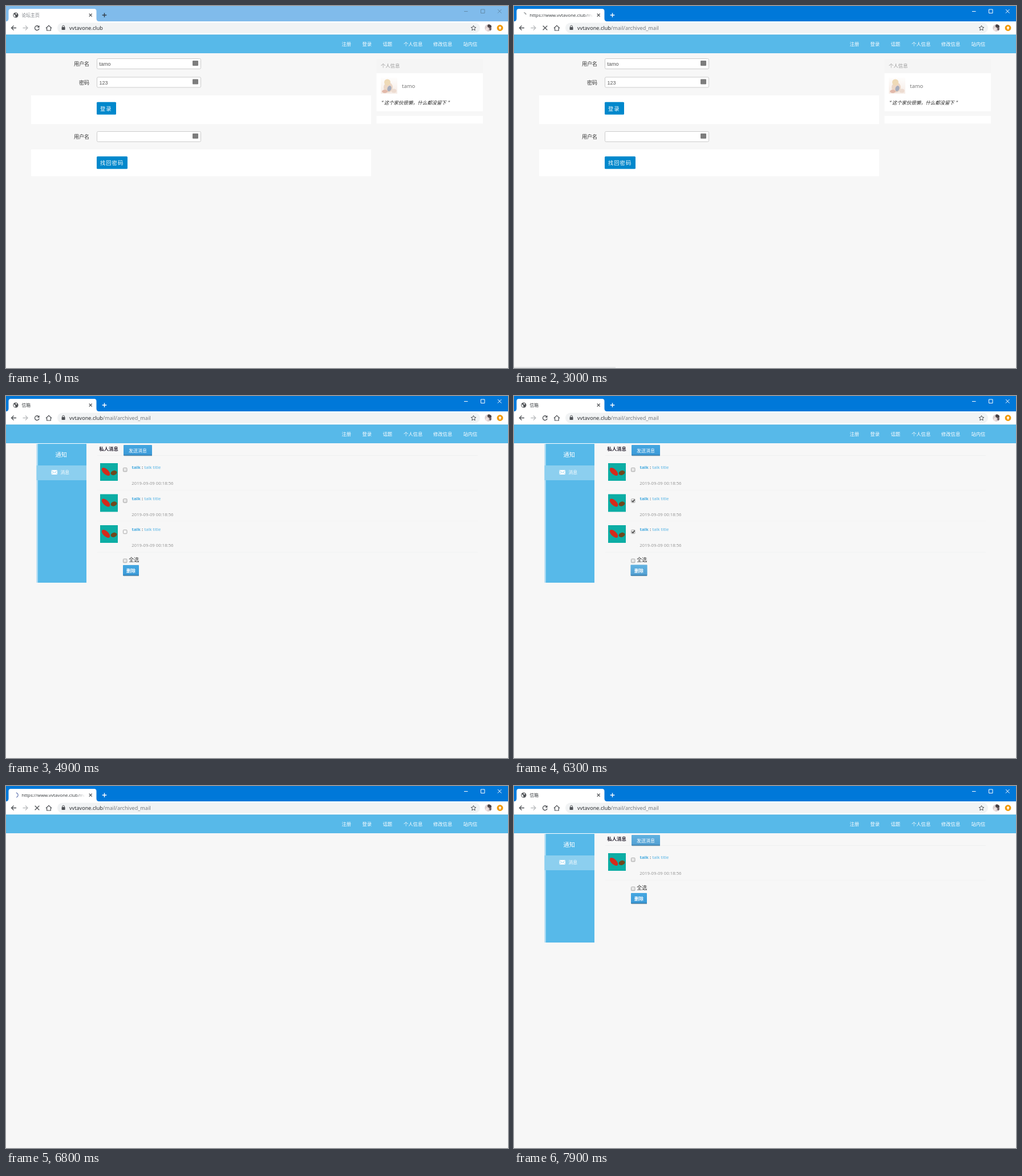
Write an HTML page with a canvas that moves like this. It is 880 px wide and 636 px high and loops after 8 s.

```html
<!DOCTYPE html>
<html lang="zh-CN">
<head>
<meta charset="utf-8">
<title>论坛主页</title>
<style>
  html, body { margin: 0; width: 100%; height: 100%; overflow: hidden; background: #f7f7f7; }
  canvas { display: block; }
</style>
</head>
<body>
<canvas id="stage" width="880" height="636"></canvas>
<script>
const LOOP = 8000;
const HOST = 'vvtavone.club', PATH = '/mail/archived_mail', USER = 'tamo', SENDER = 'talk';
const LATIN = '"Noto Sans", "Open Sans", sans-serif';
const CJK = '"Noto Sans CJK SC", "Noto Sans CJK", "Noto Sans", sans-serif';
const FORM = '"Liberation Sans", Arial, sans-serif';
const SKY = '#57b9e9', PAGE = '#f7f7f7', ICON = '#505357';
const ROW = 54.5;
const ctx = document.getElementById('stage').getContext('2d');

function rect(x, y, w, h, fill) {
  ctx.fillStyle = fill;
  ctx.fillRect(x, y, w, h);
}

function round(x, y, w, h, r, fill, stroke) {
  ctx.beginPath();
  ctx.roundRect(x, y, w, h, r);
  if (fill) { ctx.fillStyle = fill; ctx.fill(); }
  if (stroke) { ctx.strokeStyle = stroke; ctx.lineWidth = 1; ctx.stroke(); }
}

function ellipse(x, y, rx, ry, fill, turn = 0) {
  ctx.beginPath();
  ctx.ellipse(x, y, rx, ry, turn, 0, Math.PI * 2);
  ctx.fillStyle = fill;
  ctx.fill();
}

function path(d, color, width = 1.2, fill = false) {
  const shape = new Path2D(d);
  if (fill) {
    ctx.fillStyle = color;
    ctx.fill(shape);
  } else {
    ctx.strokeStyle = color;
    ctx.lineWidth = width;
    ctx.stroke(shape);
  }
}

function text(s, x, baseline, size, color, family = LATIN, style = '') {
  ctx.font = `${style} ${size}px ${family}`;
  ctx.fillStyle = color;
  ctx.fillText(s, x, baseline);
  return ctx.measureText(s).width;
}

// Chinese text placed by its vertical centre
function han(s, x, middle, size, color, style = '') {
  text(s, x, middle + size * 0.38, size, color, CJK, style);
}

function spaced(s, x, middle, size, color) {
  ctx.letterSpacing = '1px';
  han(s, x, middle, size, color);
  ctx.letterSpacing = '0px';
}

function gradient(y0, y1, top, bottom) {
  const g = ctx.createLinearGradient(0, y0, 0, y1);
  g.addColorStop(0, top);
  g.addColorStop(1, bottom);
  return g;
}

function globe() {
  ellipse(17, 16, 4.6, 4.6, ICON);
  path('M13.6 14.2 L16 16 L16.6 19 L15.2 19.6 Q13 18 13.4 15Z M16.6 12.4 L19.6 13.5 L18.4 15.2 L16.8 14.4Z', '#fff', 1, true);
}

function spinner({ from, sweep, color }) {
  ctx.beginPath();
  ctx.arc(17, 16, 4.2, from, from + sweep);
  ctx.strokeStyle = color;
  ctx.lineWidth = 1.1;
  ctx.stroke();
}

function drawTabStrip(s) {
  rect(0, 0, 880, 27, s.active ? '#0078d9' : '#80bbeb');
  path('M0 27 Q4.5 27 4.5 22 V9 Q4.5 5 8.5 5 H154.5 Q158.5 5 158.5 9 V22 Q158.5 27 163 27Z', '#fff', 1, true);
  const ink = s.active ? '#3c4043' : '#777b80';
  if (s.loading) {
    spinner(s.loading);
    ctx.save();
    ctx.beginPath();
    ctx.rect(27, 6, 112, 20);
    ctx.clip();
    const fade = ctx.createLinearGradient(122, 0, 139, 0);
    fade.addColorStop(0, ink);
    fade.addColorStop(1, 'rgba(60,64,67,0)');
    text(`https://www.${HOST}${PATH}`, 27.5, 19, 7.9, fade);
    ctx.restore();
  } else {
    globe();
    han(s.view === 'login' ? '论坛主页' : '信箱', 27.5, 16.3, 7.8, ink);
  }
  path('M145.7 13.5 l5 5 m0 -5 l-5 5', ICON, 1.1);
  path('M168.7 16 h7.6 M172.5 12.2 v7.6', s.active ? '#fff' : '#333f4a', 1.4);
  const control = s.active ? '#fff' : '#638ba9';
  path('M803 9.5 h6.5 M832.5 6 h6.5 v6.5 h-6.5Z M862 6 l6.5 6.5 m0 -6.5 l-6.5 6.5', control, 1);
}

function drawToolbar(s) {
  rect(0, 27, 880, 23, '#fff');
  path('M18 38.5 h-8.5 m4 -4 l-4 4 l4 4', ICON, 1.3);
  path('M29.5 38.5 h8.5 m-4 -4 l4 4 l-4 4', '#babcbe', 1.3);
  if (s.loading) {
    path('M50.7 34.7 l7.6 7.6 m0 -7.6 l-7.6 7.6', ICON, 1.3);
  } else {
    path('M57.6 36.4 A3.9 3.9 0 1 0 58.2 39.5', ICON, 1.3);
    path('M58.6 34 v4 h-4Z', ICON, 1, true);
  }
  path('M70 39 L75 34.3 L80 39 M71.6 38 v5 h6.8 v-5', ICON, 1.2);

  round(90, 29.5, 741, 18, 9, '#f1f3f4');
  round(97.6, 37, 6, 5, 0.7, ICON);
  path('M98.8 37.4 v-1.4 a1.8 1.8 0 0 1 3.6 0 v1.4', ICON, 1);
  const w = text(HOST, 111, 41.7, 9.1, '#2b2e31');
  if (s.path) text(PATH, 111 + w, 41.7, 9.1, '#74787c');
  path('M819.5 34.3 l1.3 2.9 l3.1 .3 l-2.4 2.1 l.7 3.1 l-2.7 -1.6 l-2.7 1.6 l.7 -3.1 l-2.4 -2.1 l3.1 -.3Z', ICON, 1);

  ellipse(845.5, 38.5, 6.2, 6.2, '#d9cdcd');
  ellipse(847.5, 35.5, 3.6, 2.8, '#4a4145', 0.5);
  ellipse(843, 41, 2.2, 2.8, '#f2e3e2', 0.5);
  ellipse(849, 40.5, 1.8, 2.4, '#6b5a5e');
  ellipse(866, 38.5, 5.4, 5.4, '#f29900');
  path('M866 35.4 l3 3.2 h-1.8 v2.6 h-2.4 v-2.6 h-1.8Z', '#fff', 1, true);
}

function drawNav() {
  rect(0, 50, 880, 33, SKY);
  rect(0, 50, 880, 0.7, '#79bde0');
  const items = [['注册', 588.5], ['登录', 624.5], ['话题', 660.5], ['个人信息', 697], ['修改信息', 749], ['站内信', 801.5]];
  for (const [label, x] of items) han(label, x, 67, 8.3, '#fff');
}

function field(label, labelX, y, value) {
  han(label, labelX, y + 10, 9, '#333');
  round(159.5, y + 0.5, 182, 18, 2, '#fff', '#ccc');
  text(value, 163.5, y + 13.2, 9, '#555', FORM);
  round(327, y + 4, 10, 9, 1, '#7d7d7d');
}

function blueButton(label, y, w) {
  round(159, y, w, 22, 1.5, '#0088cc');
  spaced(label, 165, y + 11.2, 9.3, '#fff');
}

function drawPortrait() {
  rect(657, 126, 29, 28, gradient(126, 154, '#fefdfc', '#f6ece6'));
  ellipse(670, 143, 8, 9, '#ecd7c6');
  ellipse(668.5, 134, 5.5, 5.5, '#efdab7');
  ellipse(672, 145, 3.5, 5, '#a7adbd', 0.3);
  ellipse(664, 150, 5, 3, '#e2b9aa');
  ellipse(680, 149, 4.5, 3.5, '#eddcd1');
}

function drawLogin() {
  field('用户名', 119, 92, USER);
  field('密码', 128, 124.5, '123');
  rect(44, 157, 596, 50.5, '#fff');
  blueButton('登录', 168.8, 34);
  field('用户名', 119, 220, '');
  rect(44, 252, 596, 47, '#fff');
  blueButton('找回密码', 264.2, 54);

  rect(649.5, 93, 186.5, 25, '#f5f5f5');
  han('个人信息', 657, 105.3, 8.3, '#999');
  rect(649.5, 118, 186.5, 67, '#fff');
  drawPortrait();
  text(USER, 694, 144, 9.4, '#777');
  han('" 这个家伙很懒，什么都没留下 "', 657, 170, 8.4, '#222', 'italic');
  rect(649.5, 193, 186.5, 13.5, '#fff');
}

function checkbox(y, state) {
  const fill = state === 'hover' ? '#f6f6f6' : state === 'down' ? '#cfcfcf' : gradient(y, y + 7, '#f1f1f1', '#dedede');
  round(205.5, y + 0.5, 6.5, 6.5, 1, fill, '#a9a9a9');
  if (state === 'on') path(`M206.8 ${y + 3.8} l1.7 1.8 l3 -4`, '#333', 1.5);
}

function raisedButton(label, x, y, w, textX, lit, bold) {
  const grow = lit && bold ? 0.6 : 0;
  rect(x + 1, y + 18, w - 1, 1.6, '#c3c8cb');
  round(x - grow, y - grow, w + 2 * grow, 18.5 + 2 * grow, 1,
    lit ? gradient(y, y + 18, '#61b2e1', '#529fd2') : gradient(y, y + 18, '#45a7e1', '#3a99d7'));
  rect(x, y + 17.5, w, 1, '#33709a');
  han(label, textX, y + 9.6, 8, '#fff', bold ? 'bold' : '');
}

function message(y, state, linkHover) {
  rect(165, y, 31, 31, '#0cada4');
  ellipse(175, y + 15, 9, 4.6, '#d42b1b', 0.75);
  ellipse(189, y + 17, 5.5, 4, '#70471c', -0.3);
  checkbox(y + 7.8, state);
  const w = text(SENDER, 220.5, y + 10, 7.8, linkHover ? '#2b83b5' : '#43a9df', LATIN, 'bold');
  if (linkHover) rect(220.5, y + 10.7, w, 0.7, '#2b83b5');
  text(':', 238, y + 10, 7.8, '#555', LATIN, 'bold');
  text(SENDER + ' title', 242.5, y + 10, 7.6, '#55b4e5');
  text('2019-09-09 00:18:56', 220.3, y + 38, 7.75, '#999');
}

function drawMail(s) {
  const count = s.checks.length;
  const bottom = count > 1 ? 328 : 275;
  rect(53, 83, 88, 1, '#fff');
  rect(53.5, 84, 2.5, bottom - 84, '#a9daf3');
  rect(56, 84, 85, bottom - 84, SKY);
  rect(53.5, 122, 87.5, 26, '#8ccfef');
  han('通知', 86.5, 103, 10.2, '#fff');
  round(79.5, 130, 10.5, 8, 0.8, '#fff');
  path('M79.8 131 L84.75 135 L89.7 131 M79.8 137.5 L83 134 M89.7 137.5 L86.5 134', '#8ccfef', 0.8);
  han('消息', 95.5, 134.2, 7.8, '#fff');

  rect(160, 104, 667, 0.8, '#eeefef');
  han('私人消息', 163.3, 93.2, 8.4, '#2b2433', 'bold');
  raisedButton('发送消息', 206, 86, 50, 215, s.sendHover, false);
  s.checks.forEach((state, i) => {
    message(118 + i * ROW, state, s.linkHover);
    rect(160, 165 + i * ROW, 667, 0.7, '#f1f2f2');
  });
  const shift = (count - 1) * ROW;
  checkbox(176.8 + shift, '');
  han('全选', 215.3, 179 + shift, 9, '#333');
  raisedButton('删除', 205, 188 + shift, 28, 211, s.deleteHover, true);
}

// Loading ring: grey while waiting, blue while receiving
function loadingAt(t) {
  const ring = (from, sweep, color) => ({ from, sweep, color });
  if (t >= 2900 && t < 3100) return ring(-1.5 - (t < 3000 ? 0.4 : 0), t < 3000 ? 0.5 : 1.3, '#7d8085');
  if (t >= 3100 && t < 3200) return ring(-1.5, 2.7, '#5a74ae');
  if (t >= 6600 && t < 6800) return ring(-2, t < 6700 ? 0.4 : 0.7, '#8d8288');
  if (t >= 6800 && t < 6900) return ring(-1.4, 2.7, '#5a6fae');
  return null;
}

function stateAt(t) {
  const second = t < 5600 ? '' : t < 5700 ? 'down' : 'on';
  const third = t < 4900 ? '' : t < 5000 ? 'hover' : t < 5100 ? 'down' : 'on';
  const blank = (t >= 3100 && t < 3200) || (t >= 6800 && t < 6900);
  return {
    active: t >= 1200,
    view: blank ? 'blank' : t < 3100 ? 'login' : 'mail',
    path: t >= 2900,
    loading: loadingAt(t),
    status: t >= 3000 && t < 3100,
    checks: t < 6900 ? ['', second, third] : [''],
    deleteHover: t >= 6300 && t < 6900,
    linkHover: t >= 7700 && t < 7800,
    sendHover: t >= 7900
  };
}

function frame() {
  const s = stateAt(performance.now() % LOOP);
  rect(0, 0, 880, 636, PAGE);
  drawTabStrip(s);
  drawToolbar(s);
  drawNav();
  if (s.view === 'login') drawLogin();
  if (s.view === 'mail') drawMail(s);
  if (s.status) rect(0, 634, 178, 2, '#e4e5e6');
  requestAnimationFrame(frame);
}

frame();
</script>
</body>
</html>
```
